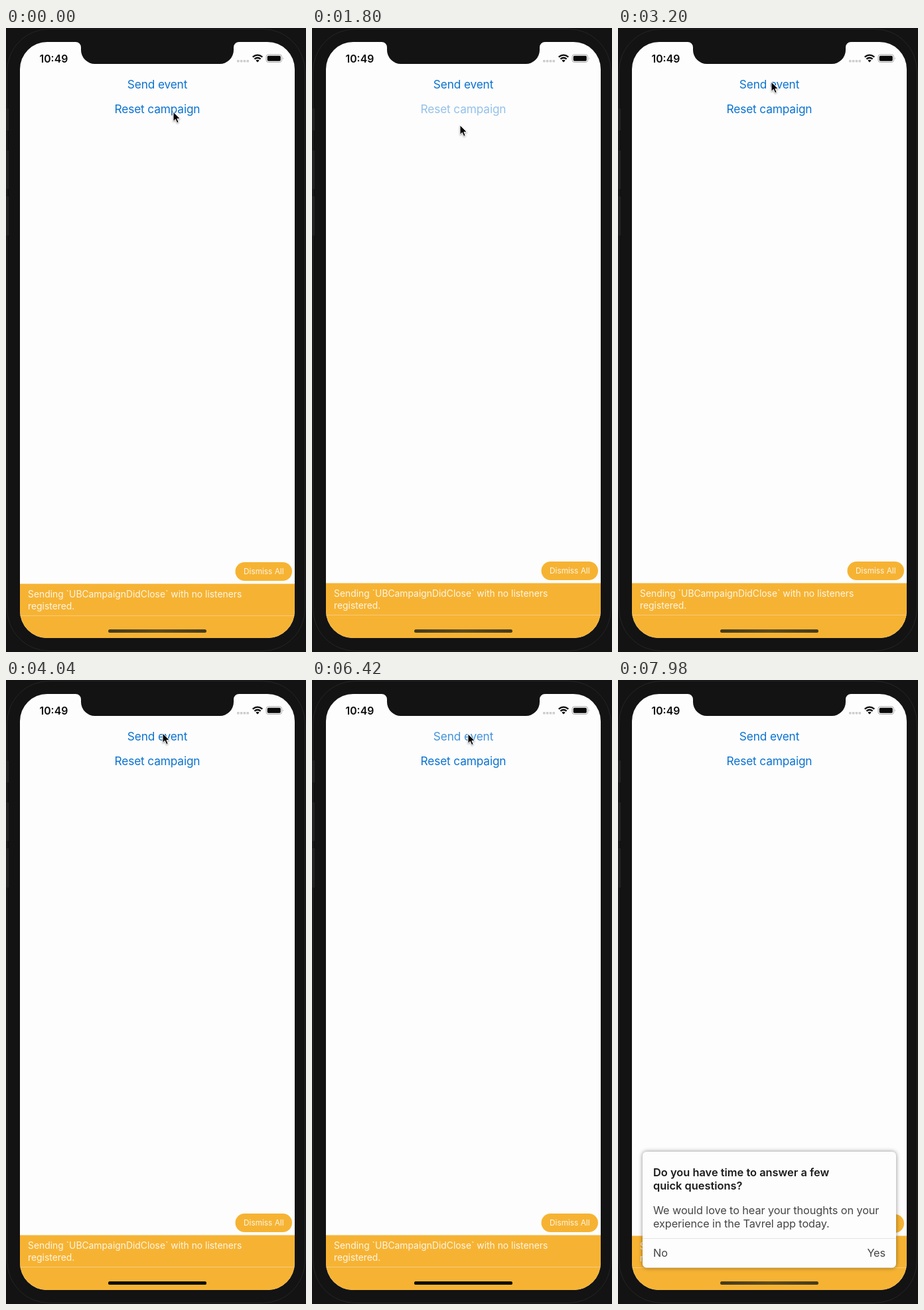
Animation of 452x938 px, one loop 8000 ms. Source, as an HTML page:

```html
<!DOCTYPE html>
<html lang="en">
<head>
<meta charset="utf-8">
<title>Campaign demo</title>
<style>
  html, body { margin: 0; width: 100%; height: 100%; overflow: hidden; background: #131314; }
  svg { display: block; width: 100%; height: 100%; }
  text { font-family: Inter, "Noto Sans", sans-serif; white-space: pre; }
  .link { font-size: 17.3px; letter-spacing: -.15px; fill: #0b73d0; text-anchor: middle; }
  .clock { font-size: 15.8px; font-weight: 600; fill: #0a0a0a; }
  .log { font-size: 13.87px; fill: #fdf6e8; }
  .pill { font-size: 11.8px; fill: #fdf6e8; text-anchor: middle; }
  .title { font-size: 16.4px; font-weight: 600; fill: #1b1b1b; }
  .body { font-size: 16.3px; letter-spacing: -.1px; fill: #454545; }
  .end { text-anchor: end; }
  #card { filter: drop-shadow(0 0 3px rgba(0, 0, 0, .45)); }
  #cursor { filter: drop-shadow(0 1px 1px rgba(0, 0, 0, .35)); }
</style>
</head>
<body>
<svg viewBox="0 0 452 938" preserveAspectRatio="none">
  <defs>
    <clipPath id="screen"><rect x="21" y="21" width="414" height="896" rx="41"/></clipPath>
    <linearGradient id="brown">
      <stop offset="0" stop-color="#453a20"/>
      <stop offset=".5" stop-color="#5c4a22"/>
      <stop offset="1" stop-color="#453a20"/>
    </linearGradient>
  </defs>

  <!-- Phone body -->
  <rect width="452" height="938" fill="#131314"/>
  <rect x="1.5" y="1.5" width="449" height="935" rx="64" fill="none" stroke="#252526"/>
  <g fill="#232324">
    <rect y="121" width="4" height="33"/>
    <rect y="184" width="4" height="58"/>
    <rect y="253" width="4" height="59"/>
  </g>

  <g clip-path="url(#screen)">
    <rect x="21" y="21" width="414" height="896" fill="#fdfdfd"/>

    <text id="send" class="link" x="228" y="90.5">Send event</text>
    <text id="reset" class="link" x="228" y="128">Reset campaign</text>

    <g id="warning">
      <rect x="345.5" y="803" width="85.5" height="28" rx="14" fill="#f6b333"/>
      <text class="pill" x="388.3" y="821.3">Dismiss All</text>
      <rect x="21" y="835.5" width="414" height="84" fill="#f6b333"/>
      <text class="log" x="33" y="856">Sending `UBCampaignDidClose` with no listeners</text>
      <text class="log" x="33" y="874">registered.</text>
      <path d="M21 883.5H435" stroke="#f9cb76"/>
    </g>

    <g id="card">
      <rect x="37" y="709" width="382" height="174.5" rx="6" fill="#fdfdfd"/>
      <text class="title" x="53" y="746">Do you have time to answer a few</text>
      <text class="title" x="53" y="766">quick questions?</text>
      <text class="body" x="53" y="803">We would love to hear your thoughts on your</text>
      <text class="body" x="53" y="823">experience in the Tavrel app today.</text>
      <path d="M37 839.5H419" stroke="#e4e4e4"/>
      <text class="body" x="53" y="867">No</text>
      <text class="body end" x="403" y="867">Yes</text>
    </g>

    <rect x="154" y="904" width="148" height="5" rx="2.5" fill="url(#brown)"/>
    <rect id="homeDark" x="154" y="904" width="148" height="5" rx="2.5" fill="#0f0f0f"/>
  </g>

  <!-- Notch and status bar -->
  <path fill="#131314" d="M105 20V21A8 8 0 0 1 113 29V33A21 21 0 0 0 134 54H322A21 21 0 0 0 343 33V29A8 8 0 0 1 351 21V20Z"/>
  <text class="clock" x="50.5" y="51.6">10:49</text>
  <g fill="#cdcdcb">
    <rect x="348" y="48" width="3.6" height="3.6" rx="1"/>
    <rect x="352.8" y="48" width="3.6" height="3.6" rx="1"/>
    <rect x="357.6" y="48" width="3.6" height="3.6" rx="1"/>
    <rect x="362.4" y="48" width="3.6" height="3.6" rx="1"/>
  </g>
  <g fill="none" stroke="#0a0a0a" stroke-width="2.3">
    <path d="M371.7 43.7Q379 37.5 386.3 43.7"/>
    <path d="M374.4 46.6Q379 42.8 383.6 46.6"/>
  </g>
  <path d="M376.3 48.7Q379 46.7 381.7 48.7L379 51.5Z" fill="#0a0a0a"/>
  <rect x="392" y="40" width="23.5" height="11.5" rx="3.3" fill="none" stroke="#a6a6a6"/>
  <rect x="393.7" y="41.7" width="20.1" height="8.1" rx="1.8" fill="#0a0a0a"/>
  <path d="M417 44Q418.7 45.7 417 47.6Z" fill="#a6a6a6"/>

  <g id="cursor">
    <path d="M0 0V14.4L3.3 11.3L5.7 16.7L8.2 15.6L5.9 10.4H10.4Z"
      fill="#050505" stroke="#fdfdfd" stroke-width="1" stroke-linejoin="round"/>
  </g>
</svg>

<script>
const LOOP = 8000;
const FADE = 1316; // button highlight fading back, in slow motion

// Rows are [ms, value, easing towards the next row].
function play(id, property, rows) {
  const frames = rows.map(([ms, value, easing = "linear"]) =>
    ({ offset: ms / LOOP, [property]: value, easing }));
  document.getElementById(id).animate(frames, { duration: LOOP, iterations: Infinity });
}

const at = (x, y) => `translate(${x}px, ${y}px)`;
const HOLD = "step-end";

const press = (down, up) => [
  [0, 1, HOLD], [down, .2, HOLD], [up, .2, "ease-in-out"], [up + FADE, 1], [LOOP, 1]
];
const flip = (before, during, from, to) => [
  [0, before, HOLD], [from, during, HOLD], [to, before, HOLD], [LOOP, before]
];

play("reset", "opacity", press(1030, 1310));
play("send", "opacity", press(5260, 5600));
play("warning", "transform", flip(at(0, 0), at(0, -1), 1200, 6700));
play("homeDark", "opacity", flip(0, 1, 3700, 6700));
play("card", "transform", [
  [0, at(0, 230), HOLD],
  [6660, at(0, 230), "cubic-bezier(.22, 1, .36, 1)"],
  [7320, at(0, 0)],
  [LOOP, at(0, 0)]
]);
play("cursor", "transform", [
  [0, at(252, 126), "ease-in-out"],
  [1800, at(223, 146), "ease-in-out"],
  [3200, at(231, 81), "ease-in-out"],
  [4040, at(236, 80)],
  [5480, at(235, 81)],
  [LOOP, at(235, 81)]
]);
play("cursor", "opacity", [[0, 1, HOLD], [7760, 0, HOLD], [LOOP, 0]]);
</script>
</body>
</html>
```
